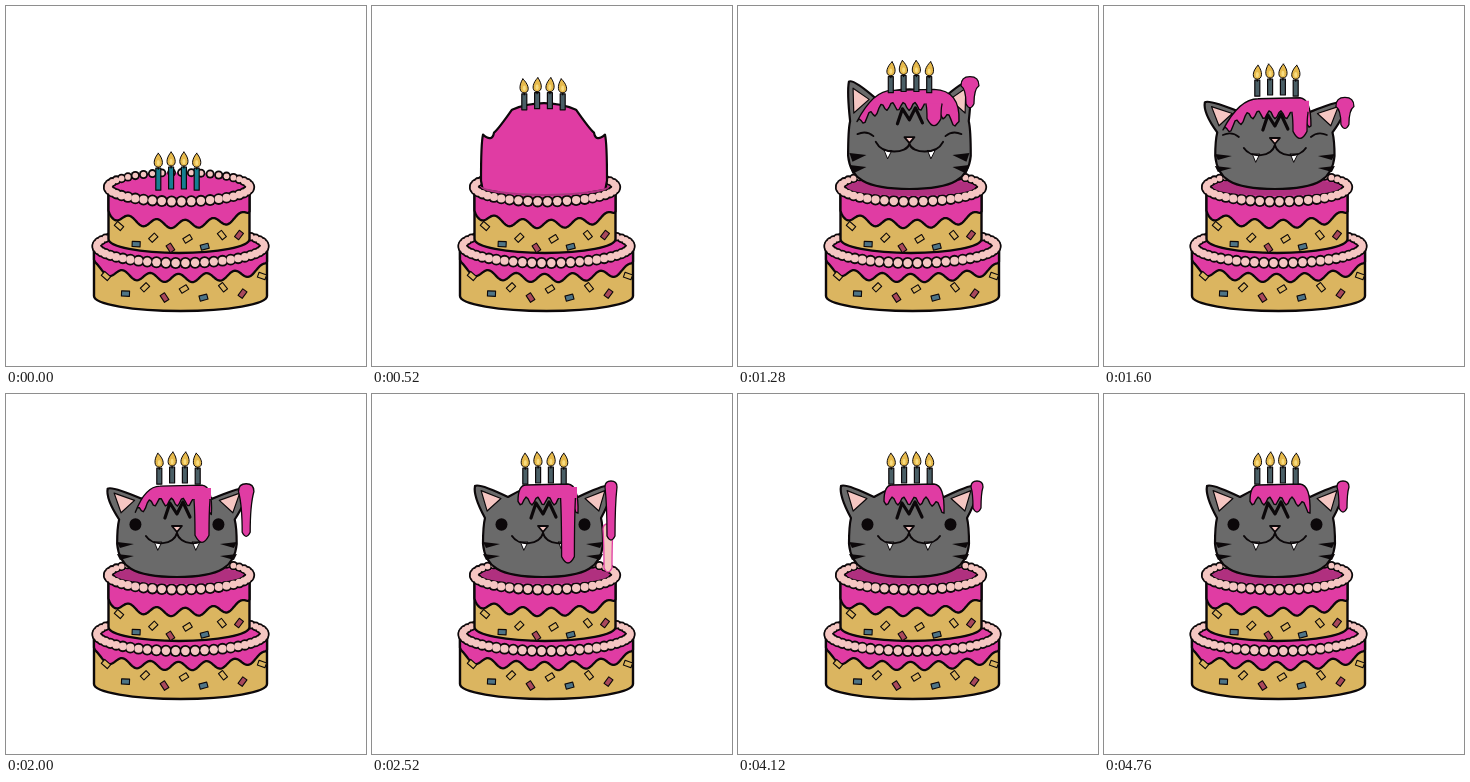
An HTML page with a canvas for the animation above (5000 ms loop, 360x360 px).

```html
<!DOCTYPE html>
<html lang="en">
<head>
<meta charset="utf-8">
<title>Cake cat</title>
<style>
  html, body { margin: 0; width: 100%; height: 100%; overflow: hidden; background: #fff; }
  canvas { display: block; }
</style>
</head>
<body>
<canvas id="stage" width="360" height="360"></canvas>
<script>
const ctx = document.getElementById('stage').getContext('2d');
const LOOP = 5000, TAU = Math.PI * 2, SIDES = [-1, 1];
const INK = '#0c080a', PINK = '#e03ca3', SHADE = '#b0307f', PALE = '#f5c6c2',
  CREAM = '#dbb560', FUR = '#6a6a6a', RED = '#a9485c', BLUE = '#4e7486';

const mix = (a, b, k) => a + (b - a) * k;
const progress = (t, from, to) => Math.min(1, Math.max(0, (t - from) / (to - from)));
const smooth = (t, from, to) => { const k = progress(t, from, to); return k * k * (3 - 2 * k); };
const bow = u => Math.sqrt(Math.max(0, 1 - u * u));

function paint(fill, line, width = 2) {
  if (fill) { ctx.fillStyle = fill; ctx.fill(); }
  if (line) { ctx.strokeStyle = line; ctx.lineWidth = width; ctx.stroke(); }
}

function lines(points, fill, line, width) {
  ctx.beginPath();
  for (const [x, y] of points) ctx.lineTo(x, y);
  if (fill) ctx.closePath();
  paint(fill, line, width);
}

function oval(x, y, rx, ry, fill, line, width) {
  ctx.beginPath();
  ctx.ellipse(x, y, rx, ry, 0, 0, TAU);
  paint(fill, line, width);
}

// A drop of icing: wide at the top, narrowing to a rounded end.
function drop(x, top, bottom, wide, narrow, fill, line) {
  const neck = mix(top, bottom, 0.4);
  ctx.beginPath();
  ctx.moveTo(x - wide, top + wide);
  ctx.quadraticCurveTo(x - wide, top, x, top);
  ctx.quadraticCurveTo(x + wide, top, x + wide, top + wide);
  ctx.quadraticCurveTo(x + narrow, neck, x + narrow, bottom - narrow);
  ctx.quadraticCurveTo(x, bottom + narrow, x - narrow, bottom - narrow);
  ctx.quadraticCurveTo(x - narrow, neck, x - wide, top + wide);
  paint(fill, line, 1.3);
}

function tier({ cx, rim, r, ringX, ringY, foot, footY, drip, low }) {
  ctx.beginPath();
  ctx.moveTo(cx - r, rim);
  ctx.lineTo(cx - r, foot);
  ctx.ellipse(cx, foot, r, footY, 0, Math.PI, 0, true);
  ctx.lineTo(cx + r, rim);
  paint(CREAM, INK, 2.4);

  ctx.beginPath();
  ctx.moveTo(cx - r, rim);
  for (let x = -r; x <= r; x++)
    ctx.lineTo(cx + x, drip + 14 * bow(x / r) + 4.2 * Math.cos((x - low) * TAU / 28));
  ctx.lineTo(cx + r, rim);
  paint(PINK, INK, 2.3);

  oval(cx, rim, ringX, ringY, PINK);
  const beads = Math.round(ringX * 0.64);
  for (const [grow, color] of [[1.8, INK], [0, PALE]])
    for (let i = 0; i < beads; i++) {
      const a = i / beads * TAU, size = 3.4 + 0.8 * Math.sin(a);
      oval(cx + ringX * Math.cos(a), rim + ringY * Math.sin(a), size + grow, size + grow, color);
    }
}

function sprinkles(cx, y, reach, count) {
  for (let i = 0; i < count; i++) {
    const u = i / (count - 1) * 2 - 1;
    ctx.save();
    ctx.translate(cx + u * reach, y + 13 * bow(u) + (i % 2 ? 5 : -4));
    ctx.rotate(Math.sin(i * 2.3 + 0.8));
    ctx.beginPath();
    ctx.rect(-4, -2.6, 8, 5.2);
    paint([CREAM, BLUE, CREAM, RED][i % 4], INK, 1.1);
    ctx.restore();
  }
}

function cake() {
  tier({ cx: 174.5, rim: 240, r: 86.5, ringX: 84, ringY: 17, foot: 290, footY: 15, drip: 258, low: 12 });
  sprinkles(178, 274, 78, 9);
  tier({ cx: 173, rim: 181, r: 70.5, ringX: 71, ringY: 14.5, foot: 233, footY: 14, drip: 204, low: -8 });
  sprinkles(173, 224, 60, 8);
}

// Every measure of the head follows from how far it is stretched (1 tall, 0 at rest).
function shapeHead(stretch, grown) {
  const outY = 124 - 20 * stretch;
  return {
    axis: 171 + stretch, stretch, outY,
    tipX: mix(50, 68 - 17 * stretch, grown), tipY: mix(outY - 4, 90 - 37 * stretch, grown),
    baseX: 35 - 3 * stretch, baseY: 103 - 24 * stretch,
    side: 60 + 3 * stretch, top: 91 - 15 * stretch
  };
}

function headPath({ axis, side, tipX, tipY, baseX, baseY, outY, top }) {
  const path = new Path2D(), x = (s, d) => axis + s * d;
  path.moveTo(x(-1, side), 150);
  path.quadraticCurveTo(x(-1, side), outY + 8, x(-1, side - 2), outY);
  path.quadraticCurveTo(x(-1, tipX + 2), tipY + 12, x(-1, tipX), tipY + 2);
  path.quadraticCurveTo(x(-1, tipX - 4), tipY - 1, x(-1, baseX), baseY);
  path.quadraticCurveTo(axis, top - 10, x(1, baseX), baseY);
  path.quadraticCurveTo(x(1, tipX - 4), tipY - 1, x(1, tipX), tipY + 2);
  path.quadraticCurveTo(x(1, tipX + 2), tipY + 12, x(1, side - 2), outY);
  path.quadraticCurveTo(x(1, side), outY + 8, x(1, side), 150);
  path.bezierCurveTo(x(1, side - 2), 172, axis + 45, 183, axis, 183);
  path.bezierCurveTo(axis - 45, 183, x(-1, side - 2), 172, x(-1, side), 150);
  return path;
}

function innerEars({ axis, tipX, tipY, baseX, baseY, side, outY }) {
  const corners = [[tipX, tipY], [baseX, baseY], [side - 2, outY]];
  const mid = [0, 1].map(n => corners.reduce((sum, c) => sum + c[n] / 3, 0));
  for (const s of SIDES)
    lines(corners.map(([x, y]) => [axis + s * mix(mid[0] - 1, x, 0.6), mix(mid[1] + 1, y, 0.6)]), PALE, INK, 1.2);
}

function face({ axis, stretch }, open) {
  const tall = Math.max(0, stretch), wide = 6 * tall;
  ctx.save();
  ctx.translate(axis, -2 * tall);
  lines([[-12, 124], [-7, 109], [0, 120], [6, 108], [13, 123]].map(([x, y]) => [x, y - 12 * tall]), null, INK, 3.2);
  for (const s of SIDES) {
    if (open) oval(s * 41.5, 130.5, 6, 6.2, INK);
    else {
      ctx.beginPath();
      ctx.moveTo(s * 36, 131);
      ctx.quadraticCurveTo(s * 43, 125, s * 52, 129);
      paint(null, INK, 1.8);
    }
    for (const y of [148, 160])
      lines([[s * 60, y], [s * 43, y + 2], [s * 57, y + 6 + 6 * tall]], INK);
    const fang = s * (19 + wide), gum = 148 - wide;
    lines([[fang - 4, gum], [fang + 4, gum], [fang, gum + 8]], '#fff', INK, 1);
    ctx.beginPath();
    ctx.moveTo(0, 139);
    ctx.bezierCurveTo(s * 3, 151 - wide, s * (24 + wide), 153 - wide, s * (31 + wide), 142 - 2 * wide);
    paint(null, INK, 2);
  }
  lines([[-5, 132], [5, 132], [0, 138]], PALE, INK, 1.8);
  ctx.restore();
}

// Torn icing left around the neck.
function collar(top, sink) {
  const points = [[106, 190], [110, top - 22 + sink]];
  for (let x = 114; x < 232; x += 5)
    points.push([x, top + sink + 3 * Math.sin(x * 1.7)]);
  lines([...points, [236, top - 22 + sink], [238, 190]], PINK, SHADE, 1.2);
}

function icing({ top }, left, right, flood) {
  const edge = x => top + 16 + flood + 0.65 * Math.max(0, 146 - x, x - 192) + 4 * Math.sin(x * 0.56);
  ctx.beginPath();
  ctx.moveTo(left, edge(left));
  for (let x = left; x <= right; x += 2) ctx.lineTo(x, edge(x));
  ctx.quadraticCurveTo(right, top, 196, top - 1);
  ctx.lineTo(154, top);
  ctx.quadraticCurveTo(mix(146, left, 0.4), top, left, edge(left));
  paint(PINK, INK, 1.4);
}

function noseDrip(t, { top }) {
  const end = t < 2520 ? mix(118, 169, progress(t, 1240, 2520)) : mix(169, 186, progress(t, 2520, 3440));
  const half = 7 * (1 - progress(t, 2400, 3800)) ;
  if (t < 1280 || half <= 0) return;
  drop(196, top + 6, end, Math.max(7, half + 1), half, PINK, INK);
  ctx.beginPath();
  ctx.rect(186, top + 2, 19, 11);
  paint(PINK);
}

function earDrip(t, { axis, tipX, tipY }) {
  const x = axis + tipX;
  if (t < 1280) {
    ctx.beginPath();
    for (let a = 0; a < TAU; a += 0.1) {
      const r = 12 + 1.5 * Math.sin(a * 7);
      ctx.lineTo(x + 2 + r * Math.cos(a), tipY + 10 + r * Math.sin(a));
    }
    ctx.closePath();
    paint(PINK, INK, 1.2);
    return;
  }
  const length = 28 + 60 * smooth(t, 1700, 2440) * (1 - smooth(t, 2840, 3120));
  if (length > 60) drop(x - 3, tipY + 40, tipY + length, 5, 4, PALE, PINK);
  drop(x, tipY - 3, tipY + Math.min(length, 56), mix(9, 6, progress(t, 1680, 2440)), 4, PINK, INK);
}

function candles(t, top) {
  const bare = t < 120, stick = bare ? 22 : 16;
  for (let i = 0; i < 4; i++) {
    const x = 152.3 + 12.8 * i + progress(t, 1120, 1440);
    const y = top + (i % 3 ? 0 : 1.2);
    const lean = bare ? 0 : Math.sin(t / 47 + i * 2) * 1.5;
    ctx.beginPath();
    ctx.rect(x - 2.5, y + 15, 5, stick);
    paint(bare ? '#167f91' : '#4a5f66', INK, 1.2);
    lines([[x, y + 16], [x, y + 11]], null, INK, 1.3);
    ctx.beginPath();
    ctx.moveTo(x + lean, y);
    ctx.bezierCurveTo(x + 6, y + 7, x + 5, y + 14, x, y + 14);
    ctx.bezierCurveTo(x - 5, y + 14, x - 6, y + 7, x + lean, y);
    paint('#e6b94b', INK, 1);
    oval(x, y + 9.5, 1.5, 2.8, '#f7dc80');
  }
}

function cat(t, flameTop) {
  const squash = 0.12 * (1 - smooth(t, 1680, 2440));
  const stretch = mix(1, -squash, smooth(t, 1120, 1440));
  const shape = shapeHead(stretch, smooth(t, 520, 920));
  const path = headPath(shape), torn = smooth(t, 600, 1000), slide = smooth(t, 1680, 2440);

  oval(173, 181, 64, 9, SHADE);
  ctx.save();
  ctx.beginPath();
  ctx.rect(0, 0, 360, 178);
  ctx.ellipse(173, 178, 66, 10, 0, 0, Math.PI);
  ctx.clip();
  if (t < 1000) ctx.translate(0, Math.max(0, flameTop - 47));

  ctx.fillStyle = FUR;
  ctx.fill(path);
  if (t > 800) innerEars(shape);
  face(shape, t >= 1840);
  ctx.save();
  ctx.clip(path);
  if (t < 1440) collar(mix(120, 178, torn), 30 * smooth(t, 1120, 1440));
  if (torn < 1) {
    ctx.fillStyle = PINK;
    ctx.fillRect(0, 0, 360, mix(135, 55, torn));
  }
  ctx.restore();
  ctx.strokeStyle = INK;
  ctx.lineWidth = 2.2;
  ctx.stroke(path);

  if (torn > 0) {
    const right = mix(232, 207, smooth(t, 1120, 1500));
    icing(shape, mix(119, 146, slide), right, 40 * (1 - torn));
    noseDrip(t, shape);
    if (t > 760) earDrip(t, shape);
  }
  ctx.restore();
}

function flameHeight(t) {
  if (t < 120) return 146;
  if (t < 600) return mix(140, 58, progress(t, 120, 600));
  return mix(58, 47, smooth(t, 600, 1000) - smooth(t, 1080, 1400));
}

// Twelve drawings a second, the first of each second held a little longer.
function step(ms) {
  const part = ms % 1000;
  const t = ms - part + (part < 120 ? 0 : 120 + 80 * Math.floor((part - 120) / 80));
  const hold = [3120, 3280, 4440, 4600, 4760].find(start => t > start && t < start + 160);
  return t > 4760 ? 4760 : hold || t;
}

function draw() {
  const t = step(performance.now() % LOOP), top = flameHeight(t);
  ctx.fillStyle = '#fff';
  ctx.fillRect(0, 0, 360, 360);
  ctx.lineJoin = ctx.lineCap = 'round';
  cake();
  if (t >= 120) cat(t, top);
  candles(t, top);
  requestAnimationFrame(draw);
}
draw();
</script>
</body>
</html>
```
